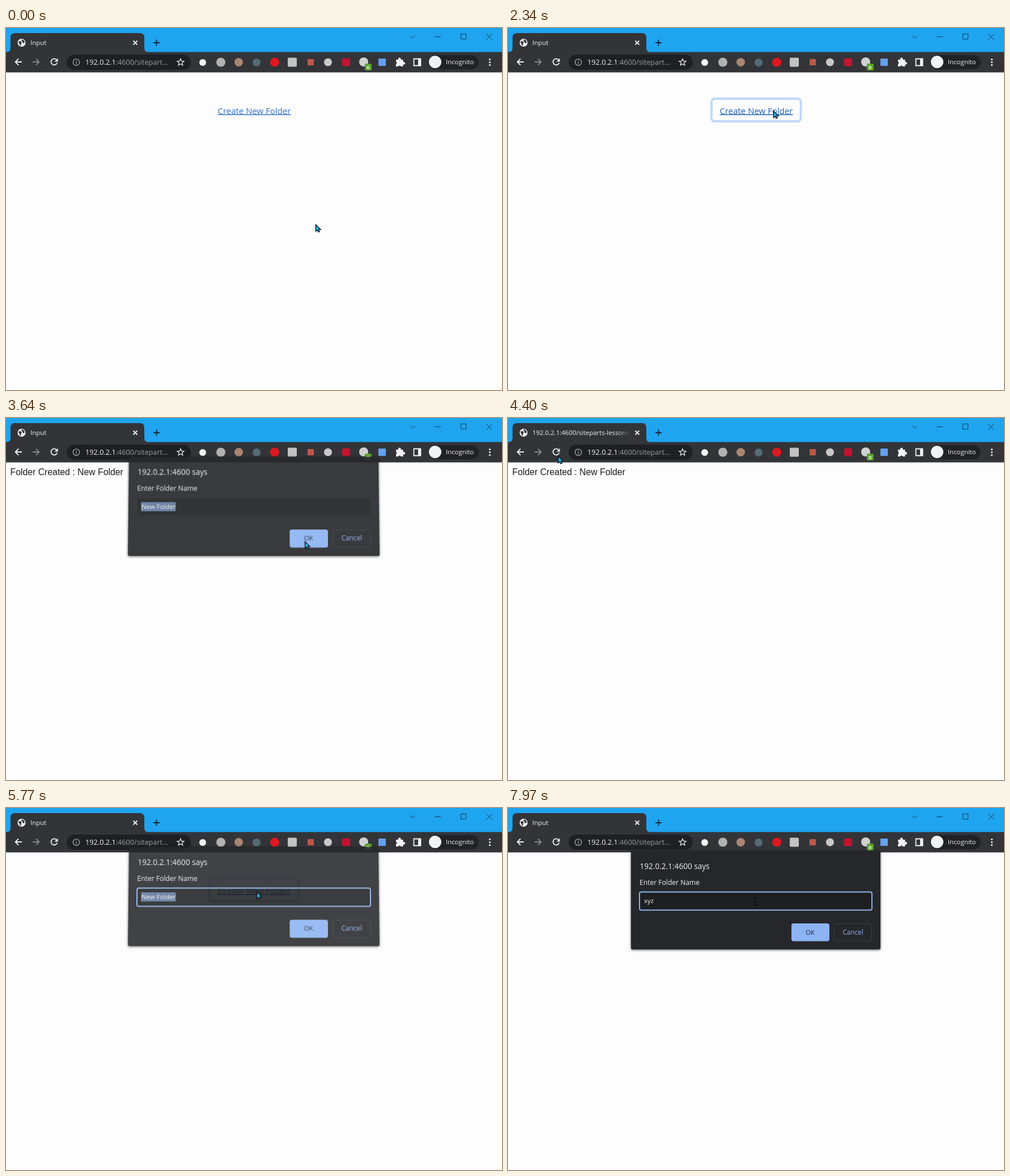
Recreate the animation shown at these times as an HTML page. Size 875 by 640 pixels, loop 8000 ms.

```html
<!DOCTYPE html>
<html lang="en">
<head>
<meta charset="utf-8">
<title>Input</title>
<style>
  html, body { margin: 0; width: 100%; height: 100%; overflow: hidden; background: #fdfdfd; }
  body { position: relative; contain: paint; }
  svg { position: absolute; left: 0; top: 0; width: 100%; height: 100%; overflow: hidden; }
  text { font: 11.4px "Open Sans", "Noto Sans", sans-serif; fill: #f1f2f3; white-space: pre; }
  .line { fill: none; stroke: #f1f2f3; stroke-width: 1.8; }
  .win { fill: none; stroke: #123a55; stroke-width: 1; }
  #link text { font-size: 15px; fill: #3474cc; text-decoration: underline; }
  #link.hover text { fill: #1f60b4; }
  #created { font: 15.8px "Liberation Sans", Arial, sans-serif; fill: #1c1c1c; }
  #dialog {
    left: 207px; top: 66px; width: 460px; height: 200px;
    transform-origin: 230px 10px; filter: drop-shadow(0 1px 2px rgba(0, 0, 0, .65));
  }
</style>
</head>
<body>
<svg viewBox="0 0 875 640">
  <defs>
    <linearGradient id="fade">
      <stop offset="0" stop-color="#333438" stop-opacity="0"/>
      <stop offset=".8" stop-color="#333438"/>
    </linearGradient>
  </defs>

  <!-- title bar -->
  <rect width="875" height="43" fill="#1fa4ef"/>
  <path d="M0 43Q8 43 8 35V17Q8 9 16 9H236Q244 9 244 17V35Q244 43 252 43Z" fill="#333438"/>
  <circle cx="27.5" cy="26" r="7" fill="#f1f2f3"/>
  <path d="M22 24l4-1 2 3-2 2 1 3-2 0-2-4ZM28 20l4 2 1 4-3 1-1-3-2-2Z" fill="#333438"/>
  <text id="tabTitle" x="43" y="30">Input</text>
  <rect x="194" y="12" width="27" height="28" fill="url(#fade)"/>
  <path class="line" d="M224.500 22.500l7 7m0-7l-7 7"/>
  <path d="M260 26h11M265.500 20.500v11" fill="none" stroke="#10283a" stroke-width="1.800"/>
  <path class="win" d="M713 13.500l4.500 4.500 4.500-4.500M756 15.500h11M802.500 10.500h9v9h-9ZM847.500 10.500l10 10m0-10l-10 10"/>

  <!-- toolbar -->
  <rect y="42.500" width="875" height="36" fill="#333438"/>
  <path class="line" d="M28 60H16.500M22 54.500L16.500 60l5.500 5.500"/>
  <path class="line" d="M47 60H58.500M53 54.500L58.500 60l-5.500 5.500" style="stroke:#85878b"/>
  <path class="line" d="M89 56A5.500 5.500 0 1 0 90.300 61.500"/>
  <path d="M91.500 53.500v6h-6Z" fill="#f1f2f3"/>
  <rect x="107" y="47" width="219" height="27" rx="13.500" fill="#1e2023"/>
  <g fill="none" stroke="#a5a9ad" stroke-width="1.300">
    <circle cx="124" cy="60.500" r="5.700"/>
    <path d="M124 59.500v4M124 57v1.300"/>
  </g>
  <text x="140" y="65" style="font-size:12.700px">192.0.2.1<tspan fill="#9aa0a6">:4600/sitepart...</tspan></text>
  <path d="M308 54.500l1.700 4 4.300.300-3.300 2.800 1.100 4.200-3.800-2.300-3.800 2.300 1.100-4.200-3.300-2.800 4.300-.300Z" fill="none" stroke="#e4e6e8" stroke-width="1.300"/>

  <!-- extensions -->
  <circle cx="347" cy="61" r="6" fill="#f4f4f4"/>
  <circle cx="379" cy="60.500" r="8" fill="#b2b2b2"/>
  <circle cx="410.500" cy="60.500" r="7.500" fill="#a98672"/>
  <circle cx="442" cy="61" r="7" fill="#536b76"/>
  <circle cx="474" cy="60.500" r="8" fill="#df1720"/>
  <rect x="497" y="52.500" width="16" height="16" rx="2" fill="#c3c3c3"/>
  <rect x="532" y="55" width="11" height="11" fill="#bd5849"/>
  <circle cx="568" cy="60.500" r="7" fill="#c8c8c8"/>
  <rect x="593" y="53.500" width="14" height="14" rx="3" fill="#c41331"/>
  <circle cx="631" cy="60" r="8" fill="#cfd1d2"/>
  <rect x="633" y="63" width="12" height="12" rx="2" fill="#5ba329"/>
  <text x="636.300" y="72.500" style="font-size:9px;font-weight:700">0</text>
  <rect x="657" y="54" width="13" height="13" rx="1" fill="#61a2ef"/>
  <path d="M688 56h4a2.500 2.500 0 1 1 4.500 0h4v4a2.500 2.500 0 1 1 0 4.500v3.500h-4a2.500 2.500 0 0 0-4.500 0h-4v-4a2.500 2.500 0 0 0 0-4.500Z" fill="#f1f2f3"/>
  <path d="M719.500 54.500h12v12h-12Z" class="line"/>
  <rect x="727" y="54" width="5" height="13" fill="#f1f2f3"/>
  <rect x="745" y="48" width="89" height="25" rx="12.500" fill="#202225"/>
  <circle cx="757" cy="60" r="11" fill="#f1f2f3"/>
  <text x="776" y="64">Incognito</text>
  <g fill="#f1f2f3">
    <circle cx="853.500" cy="55.500" r="1.600"/><circle cx="853.500" cy="60.500" r="1.600"/><circle cx="853.500" cy="65.500" r="1.600"/>
  </g>

  <!-- page -->
  <g id="link">
    <rect id="ring" x="359" y="125" width="157.500" height="40" rx="5.500" fill="none" stroke="#bfd8fb" stroke-width="4"/>
    <text x="373.500" y="151.500">Create New Folder</text>
  </g>
  <text id="created" x="7.500" y="101">Folder Created : New Folder</text>
</svg>

<svg id="dialog" viewBox="207 66 460 200">
  <path d="M217 76H657V247Q657 250 654 250H220Q217 250 217 247Z" fill="#25272a"/>
  <text x="232.500" y="108" style="font-size:13.600px">192.0.2.1:4600 says</text>
  <text x="232" y="136" style="font-size:12.100px">Enter Folder Name</text>
  <rect x="233" y="149.500" width="408" height="30" rx="2" fill="#1d1f21"/>
  <rect id="focus" x="232" y="148.500" width="410" height="32" rx="3" fill="none" stroke="#8fb2ee" stroke-width="2"/>
  <rect id="selection" x="239" y="156" width="61" height="16" fill="#60789b"/>
  <text id="field" x="240" y="168">New Folder</text>
  <rect id="caret" y="157" width="1" height="14" fill="#f1f2f3"/>
  <rect x="500" y="204" width="67" height="31.500" rx="4" fill="#8cb3f2"/>
  <text x="525" y="223.500" style="fill:#202838">OK</text>
  <rect x="575.500" y="204.500" width="66" height="30.500" rx="4" fill="none" stroke="#3b3e43"/>
  <text x="590.500" y="223.500" style="font-size:11.700px;fill:#8cb3f2">Cancel</text>
</svg>

<svg viewBox="0 0 875 640">
  <g id="pointer">
    <path id="arrow" d="M.500.500V12.500L3.300 10 5 14 7.200 13 5.500 9.300H9.200Z" fill="#27b4e6" stroke="#0b1116" stroke-width="1.300"/>
    <path id="beam" d="M-3-6.500H-1L0-5.500 1-6.500H3M0-5.500V5.500M-3 6.500H-1L0 5.500 1 6.500H3" fill="none" stroke="#080a0d" stroke-width="1.300"/>
  </g>
</svg>

<script>
const LOOP = 8000;
const get = id => document.getElementById(id);
const show = (id, on) => { get(id).style.visibility = on ? "visible" : "hidden"; };
const within = (t, from, to) => t >= from && t < to;
const ramp = (t, from, to) => Math.min(1, Math.max(0, (t - from) / (to - from)));
const smooth = p => p * p * (3 - 2 * p);

// pointer stops: time, x, y
const path = [
  [0, 546, 347], [1500, 546, 347], [2150, 468, 146], [2650, 468, 146],
  [3250, 527, 218], [3680, 527, 218], [3880, 470, 335], [4320, 88, 67],
  [4520, 88, 67], [4950, 442, 148], [5920, 442, 148], [6300, 436, 165], [LOOP, 436, 165]
];
const typing = [6850, 7050, 7250];

function pointerAt(t) {
  const i = path.findIndex(stop => stop[0] > t);
  const [t0, x0, y0] = path[i - 1], [t1, x1, y1] = path[i];
  const p = smooth(ramp(t, t0, t1));
  return [x0 + (x1 - x0) * p, y0 + (y1 - y0) * p];
}

function drawDialog(t) {
  const second = t > 5000;
  const opens = second ? 5736 : 2550;
  const closing = second ? 0 : smooth(ramp(t, 3540, 3640));
  const alpha = ramp(t, opens, opens + 40) * (second ? 1 : 1 - ramp(t, 3635, 3705));
  const settle = 1 - (1 - ramp(t, opens + 30, opens + 210)) ** 2;
  const lift = Math.max(1 - settle, closing);
  const dialog = get("dialog");
  dialog.style.opacity = alpha;
  dialog.style.transform = `translateY(${-7.5 * lift}px) perspective(1000px) rotateX(${3 * lift}deg)`;

  const typed = second ? typing.filter(key => key <= t).length : 0;
  const field = get("field");
  field.textContent = typed ? "xyz".slice(0, typed) : "New Folder";
  get("focus").style.opacity = second || t < 3480 ? 1 : 0;
  show("selection", !typed);
  show("caret", typed && (t - typing[typed - 1]) % 1000 < 500);
  if (typed) get("caret").setAttribute("x", 240.5 + field.getComputedTextLength());
  return alpha === 1 && lift === 0;
}

function draw(t) {
  const [x, y] = pointerAt(t);
  const created = within(t, 3600, 4600);
  const dialogReady = drawDialog(t);

  show("link", !created);
  show("created", created);
  get("ring").style.opacity = t < 3600 ? ramp(t, 2180, 2320) : ramp(t, 5400, 5550);
  get("link").classList.toggle("hover", x > 361 && x < 515 && y > 127 && y < 163);
  get("tabTitle").textContent = within(t, 3700, 4600) ? "192.0.2.1:4600/siteparts-lessons" : "Input";

  const overField = dialogReady && x > 232 && x < 643 && y >= 148 && y < 181;
  show("arrow", !overField);
  show("beam", overField);
  get("pointer").setAttribute("transform", `translate(${Math.round(x)} ${Math.round(y)})`);
}

const start = performance.now();
function tick() {
  draw((performance.now() - start) % LOOP);
  requestAnimationFrame(tick);
}
tick();
</script>
</body>
</html>
```
